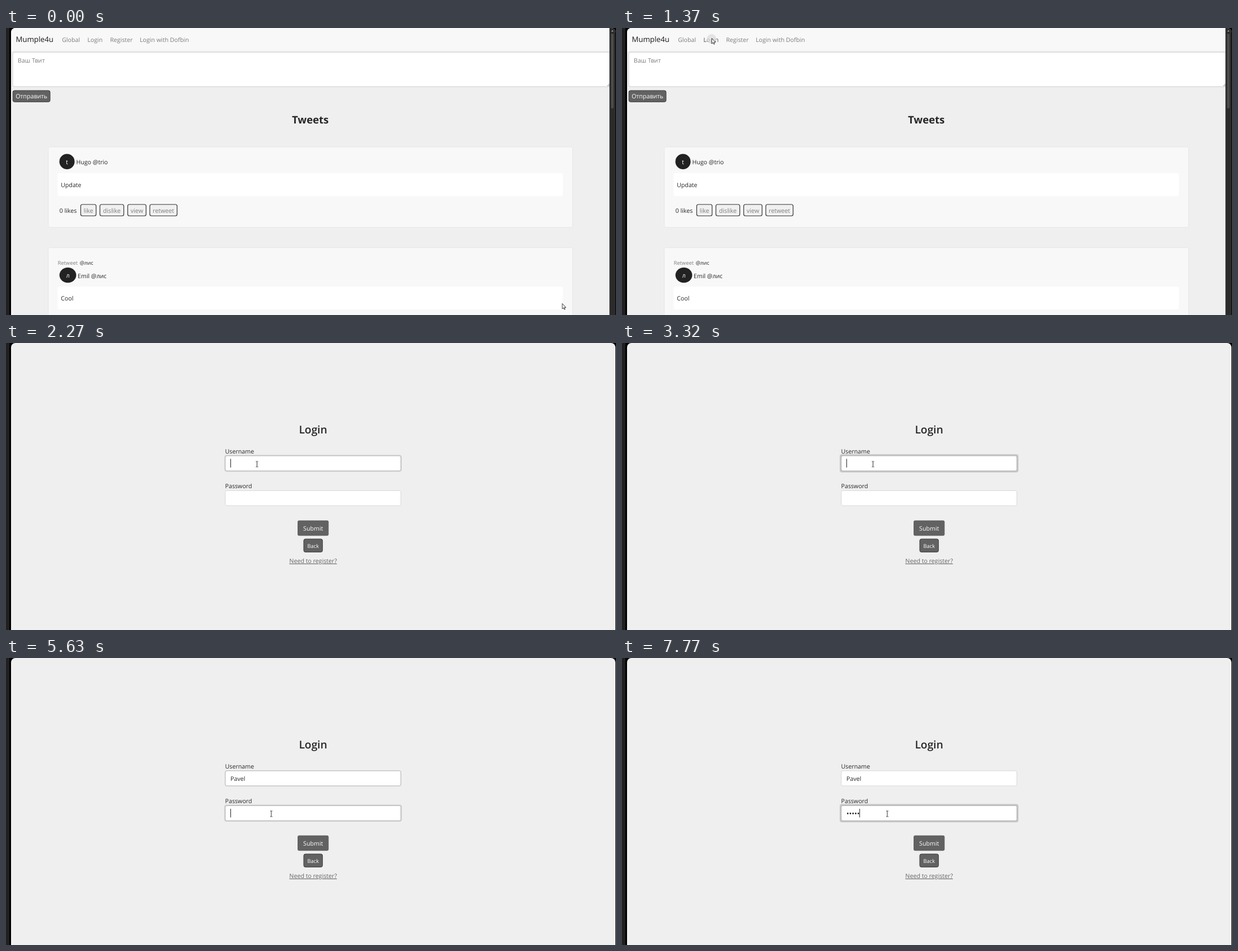
An HTML page that plays this animation: 1090x514 px, repeating every 8 s.

```html
<!DOCTYPE html>
<html lang="en">
<head>
<meta charset="utf-8">
<title>Login walkthrough</title>
<style>
  html, body { margin: 0; width: 100%; height: 100%; overflow: hidden; background: #000; }
  svg { display: block; width: 100%; height: 100%; }
  text { font: 10.7px "Open Sans", "Noto Sans", sans-serif; fill: #262626; text-rendering: geometricPrecision; }
  .mid { text-anchor: middle; }
  .muted { fill: #7c7c7c; }
  .light { fill: #fff; }
  .brand { font-size: 13.3px; fill: #191919; }
  .small { font-size: 9.4px; }
  .dots { font-size: 12.6px; }
  .link { fill: #666; text-decoration: underline; }
  .title { font-size: 18.6px; font-weight: 700; }
  .heading { font-size: 19.3px; font-weight: 600; }
</style>
</head>
<body>
<svg id="stage" viewBox="0 0 1090 514"></svg>
<script>
const LOOP = 8000;
const USER = 'Pavel';
const USER_KEYS = [3420, 3710, 4010, 4210, 4310];
const PASS_KEYS = [6640, 6950, 7250, 7550, 7770];

const text = (x, y, s, cls = '', attrs = '') => `<text x="${x}" y="${y}" class="${cls}" ${attrs}>${s}</text>`;
const box = (x, y, w, h, fill, stroke = 'none', r = 3, attrs = '') =>
  `<rect x="${x}" y="${y}" width="${w}" height="${h}" rx="${r}" fill="${fill}" stroke="${stroke}" ${attrs}/>`;
const avatar = (cx, cy, rx, letter) =>
  `<ellipse cx="${cx}" cy="${cy}" rx="${rx}" ry="13.7" fill="#222"/>` + text(cx, cy + 4.5, letter, 'mid light');
const action = (x, w, label) =>
  box(x, 316, w, 20.5, '#f0f0f0', '#333', 3, 'stroke-width="1.2"') + text(x + w / 2, 330.5, label, 'mid muted');
const card = (y, h) => box(75.5, y, 937, h, '#f8f8f8', '#e6e6e6');
const message = (y, s) => box(92.5, y, 902.5, 41, '#fff') + text(98, y + 25, s);
const field = (id, y) => `
  <rect id="${id}Ring" rx="4" fill="#c6c6c6"/>
  <rect id="${id}Box" x="391.8" y="${y}" width="313.8" height="27" rx="3" fill="#fff"/>`;

const feed = `<g id="feed">
  ${box(9, 0, 1070, 41, '#f8f8f8', 'none', 0)}
  ${text(17.5, 25, 'Mumple4u', 'brand')}
  ${text(100, 24.5, 'Global', 'muted')}
  ${text(145.5, 24.5, 'Login', 'muted', 'id="loginLink"')}
  ${text(186, 24.5, 'Register', 'muted')}
  ${text(239, 24.5, 'Login with Dofbin', 'muted')}
  ${box(12, 43.3, 1068, 61.7, '#fff', '#ccc')}
  <path d="M1074.5 104L1079 99.5M1077 104L1079 102" stroke="#555" stroke-width=".8"/>
  ${text(21, 62, 'Ваш Твит', 'muted')}
  ${box(12.2, 112, 66.6, 20.3, '#626262', '#3a3a3a')}
  ${text(45.5, 126.3, 'Отправить', 'mid light')}
  ${text(543.7, 170.5, 'Tweets', 'title mid')}
  ${card(213, 144)}
  ${avatar(109, 239.3, 13.6, 't')}
  ${text(125.5, 244.3, 'Hugo @trio')}
  ${message(260, 'Update')}
  ${text(95.5, 330.5, '0 likes')}
  ${action(133.5, 27.5, 'like')}
  ${action(167.8, 42.7, 'dislike')}
  ${action(217.5, 32.8, 'view')}
  ${action(257, 48.7, 'retweet')}
  ${card(393.3, 150)}
  ${text(92.5, 424.3, 'Retweet', 'small muted')}
  ${text(131.7, 424.3, '@лис', 'small')}
  ${avatar(110.5, 442.6, 15, 'л')}
  ${text(128, 447.6, 'Emil @лис')}
  ${message(463, 'Cool')}
  ${box(1078.3, 0, 11, 514, '#2b2b2b', 'none', 0)}
  ${box(1081.3, 10, 4.4, 134, '#4d4d4d', 'none', 2)}
  <path d="M1081.5 6.5L1083.6 3.5L1085.7 6.5Z" fill="#9a9a9a"/>
</g>`;

const login = `<g id="login">
  ${text(548.7, 162.3, 'Login', 'heading mid')}
  ${text(391.5, 197.5, 'Username')}
  ${field('user', 202)}
  ${text(401, 220, '', '', 'id="userText"')}
  ${text(391.5, 260, 'Password')}
  ${field('pass', 264.4)}
  ${text(401, 283.2, '', 'dots', 'id="passText"')}
  <rect id="caret" width="1" height="15.5" fill="#222"/>
  ${box(521, 317.8, 55.5, 27.4, '#626262')}
  ${text(548.8, 336, 'Submit', 'mid light')}
  ${box(532, 351, 33.6, 23.4, '#626262', '#3a3a3a')}
  ${text(548.8, 366.6, 'Back', 'mid light small')}
  ${text(548.8, 394, 'Need to register?', 'mid link')}
</g>`;

document.getElementById('stage').innerHTML = `
  <clipPath id="window"><rect x="9" y="0" width="1080" height="530" rx="8"/></clipPath>
  <rect width="1090" height="514"/>
  <rect width="6" height="514" fill="#211f20"/>
  <g clip-path="url(#window)"><rect width="1090" height="514" fill="#efefef"/>${feed}${login}</g>
  <circle id="ripple" cx="160" cy="19.5" r="8.5" fill="#dedede" opacity=".75"/>
  <path id="arrow" d="M.5.5V10L2.7 8L4.2 11.2L5.6 10.6L4.2 7.5H7Z" fill="#fff" stroke="#222" stroke-width=".9"/>
  <path id="beam" d="M-2-5H-.6L0-4.5L.6-5H2M0-4.5V4.5M-2 5H-.6L0 4.5L.6 5H2" fill="none" stroke="#333"/>`;

const $ = id => document.getElementById(id);
const set = (id, attrs) => { for (const k in attrs) $(id).setAttribute(k, attrs[k]); };
const show = (id, on) => set(id, { visibility: on ? 'visible' : 'hidden' });
const within = (t, from, to) => t >= from && t < to;
const passed = (t, times) => times.filter(v => v <= t).length;
const smooth = k => k * k * (3 - 2 * k);
const mix = (a, b, k) => a.map((v, i) => v + (b[i] - v) * k);

function pointer(t) {
  if (t < 900) return mix([993.5, 493], [153, 24], smooth(Math.floor(t / 100) / 8));
  if (t < 980) return [157, 22.5];
  if (t < 5230) return mix([160, 18], [448.5, 217], smooth(passed(t, [1680, 1780, 1880, 1970, 2070]) / 5));
  return mix([448.5, 217], [474, 279], smooth(passed(t, [5230, 5330, 5430]) / 3));
}

function setFocus(id, y, amount) {
  const spread = 0.5 + 2.3 * amount;
  set(id + 'Ring', {
    x: 391.8 - spread, y: y - spread, width: 313.8 + 2 * spread, height: 27 + 2 * spread,
    opacity: amount
  });
  set(id + 'Box', { stroke: amount ? '#b0b0b0' : '#d8d8d8' });
}

function render(t) {
  const onLogin = t >= 1490;
  show('feed', !onLogin);
  show('login', onLogin);

  const clicking = within(t, 1370, 1490);
  show('ripple', clicking);
  $('loginLink').style.fill = clicking ? '#4a4a4a' : '';

  const [x, y] = pointer(t);
  const overField = onLogin && y > 202;
  show('arrow', !overField);
  show('beam', overField);
  set(overField ? 'beam' : 'arrow', { transform: `translate(${x} ${y})` });

  setFocus('user', 202, within(t, 2270, 5730) ? (t < 2370 ? 0.5 : t < 5630 ? 1 : 0.2) : 0);
  setFocus('pass', 264.4, t < 5630 ? 0 : t < 5730 ? 0.6 : 1);

  $('userText').textContent = USER.slice(0, passed(t, USER_KEYS));
  $('passText').textContent = '•'.repeat(passed(t, PASS_KEYS));

  const inPass = t >= 5630;
  const blinkedOff = within(t, 2780, 3320) || within(t, 4930, 5230) || within(t, 6140, 6640);
  show('caret', t >= 2270 && !blinkedOff);
  const typed = $(inPass ? 'passText' : 'userText');
  set('caret', { x: 401 + (typed.textContent ? typed.getComputedTextLength() - 0.5 : 0), y: inPass ? 270 : 207.5 });
}

const start = performance.now();
function frame() {
  render((performance.now() - start) % LOOP);
  requestAnimationFrame(frame);
}
frame();
</script>
</body>
</html>
```
